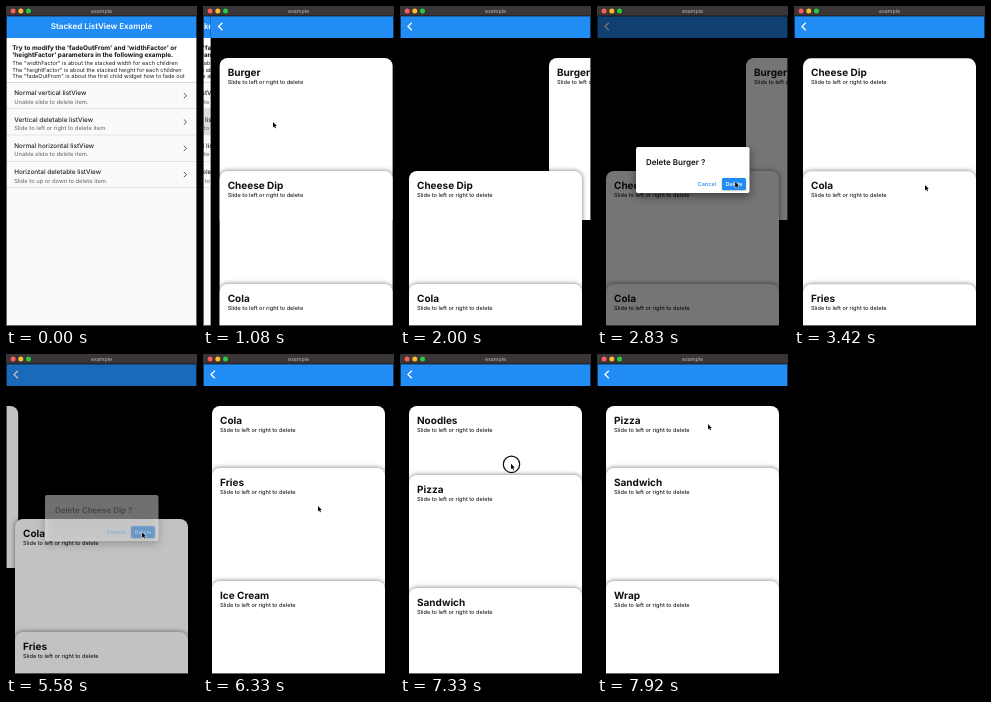
Recreate the animation shown at these times as an HTML page with a canvas. Size 191 by 320 pixels, loop 8000 ms.

```html
<!DOCTYPE html>
<html lang="en">
<head>
<meta charset="utf-8">
<title>Stacked ListView Example</title>
<style>
  html, body { margin: 0; width: 100%; height: 100%; overflow: hidden; background: #000; }
  canvas { display: block; width: 191px; height: 320px; }
</style>
</head>
<body>
<canvas></canvas>
<script>
const W = 191, H = 320, LOOP = 8000;
const BLUE = '#218cf3';
const LIST_TOP = 52, STEP = 113, CARD_W = 173, CARD_H = 162;
const MEALS = ['Burger', 'Cheese Dip', 'Cola', 'Fries', 'Ice Cream', 'Noodles', 'Pizza', 'Sandwich', 'Wrap'];
const ROWS = [
  ['Normal vertical listView', 'Unable slide to delete item.'],
  ['Vertical deletable listView', 'Slide to left or right to delete item.'],
  ['Normal horizontal listView', 'Unable slide to delete item.'],
  ['Horizontal deletable listView', 'Slide to up or down to delete item.'],
];

// The story: open a page, swipe away two cards, then scroll three times.
const TAP = 720, SWIPE_TIME = 540, FADE = 150;
const DELETIONS = [
  { grab: 1450, asked: 2230, confirmed: 2950, dx: 140 },
  { grab: 3990, asked: 4520, confirmed: 5450, dx: -125 },
];
const SCROLLS = [
  { start: 6020, time: 300, distance: 51 },
  { start: 6500, time: 660, distance: 327 },
  { start: 7250, time: 670, distance: 125 },
];
const BUTTON = { x: 137, y: 177 };
const MOVES = [
  { start: 80, time: 620, x: 70, y: 116 },
  { start: DELETIONS[0].grab, time: SWIPE_TIME, x: 210, y: 110 },
  { start: 2230, time: 650, ...BUTTON },
  { start: 3080, time: 340, x: 131, y: 179 },
  { start: 3420, time: 500, x: 151, y: 108 },
  { start: DELETIONS[1].grab, time: SWIPE_TIME, x: 26, y: 102 },
  { start: 4750, time: 600, ...BUTTON },
  { start: 5520, time: 460, x: 117, y: 203 },
  { start: SCROLLS[0].start, time: 300, x: 115, y: 152 },
  { start: SCROLLS[1].start, time: 500, x: 111, y: 113 },
  { start: SCROLLS[2].start, time: 480, x: 111, y: 70 },
];
const PRESSES = [
  { start: TAP, time: 140 },
  ...DELETIONS.flatMap(d => [{ start: d.grab, time: SWIPE_TIME - 80 }, { start: d.confirmed - 50, time: 100 }]),
  ...SCROLLS.map(s => ({ start: s.start, time: 200 })),
];

const canvas = document.querySelector('canvas');
const ctx = canvas.getContext('2d');
const scale = window.devicePixelRatio || 1;
canvas.width = W * scale;
canvas.height = H * scale;
ctx.textRendering = 'geometricPrecision';

// Eased progress from 0 to 1 over a span of time.
function phase(t, start, time) {
  const u = Math.min(1, Math.max(0, (t - start) / time));
  return u * u * (3 - 2 * u);
}

function total(items, value) {
  return items.reduce((sum, item) => sum + value(item), 0);
}

const scrollAt = t => total(SCROLLS, s => s.distance * phase(t, s.start, s.time));
const collapseAt = (d, t) => phase(t, d.confirmed + 200, 280);
const swipeAt = (d, t) =>
  d.dx * phase(t, d.grab, SWIPE_TIME) + Math.sign(d.dx) * 80 * phase(t, d.confirmed + 50, FADE);
const dialogAt = (d, t) => phase(t, d.asked, FADE) - phase(t, d.confirmed + 50, FADE);

function cursorAt(t) {
  return MOVES.reduce((from, move) => {
    const p = phase(t, move.start, move.time);
    return { x: from.x + (move.x - from.x) * p, y: from.y + (move.y - from.y) * p };
  }, { x: 198, y: 148 });
}

function text(str, x, y, size, color, weight = 400, align = 'left') {
  ctx.font = `${weight} ${size}px Inter, sans-serif`;
  ctx.textAlign = align;
  ctx.fillStyle = color;
  ctx.fillText(str, x, y);
}

function rect(x, y, w, h, color, radius = 0) {
  ctx.fillStyle = color;
  ctx.beginPath();
  ctx.roundRect(x, y, w, h, radius);
  ctx.fill();
}

function chevron(x, y, dx, dy, color, width) {
  ctx.beginPath();
  ctx.moveTo(x - dx, y - dy);
  ctx.lineTo(x, y);
  ctx.lineTo(x - dx, y + dy);
  ctx.strokeStyle = color;
  ctx.lineWidth = width;
  ctx.stroke();
}

function shadow(color, blur, offset = 0) {
  ctx.shadowColor = color;
  ctx.shadowBlur = blur * scale;
  ctx.shadowOffsetY = offset * scale;
}

function noShadow() {
  ctx.shadowColor = 'transparent';
}

function drawHome(t) {
  rect(0, 10, W, H, '#fafafa');
  rect(0, 10, W, 22, BLUE);
  text('Stacked ListView Example', W / 2, 23, 8, '#fff', 600, 'center');
  rect(0, 32, W, 44, '#fff');
  text("Try to modify the 'fadeOutFrom' and 'widthFactor' or", 6.2, 43.5, 6.4, '#111', 700);
  text("'heightFactor' parameters in the following example.", 6.2, 51.2, 6.4, '#111', 700);
  ['"widthFactor" is about the stacked width for each children',
    '"heightFactor" is about the stacked height for each children',
    '"fadeOutFrom" is about the first child widget how to fade out',
  ].forEach((line, i) => text('The ' + line, 6.2, 59 + i * 6.7, 5.6, '#222'));
  rect(0, 76, W, 0.6, '#bbb');
  ROWS.forEach(([title, note], i) => {
    const y = 76.5 + i * 26.3;
    if (i === 1 && t > TAP) rect(0, y, W, 26, '#ddd');
    text(title, 8.2, y + 12.8, 6.4, '#222', 500);
    text(note, 8.2, y + 21.3, 5.75, '#777', 500);
    chevron(180.5, y + 13.2, 2.7, 2.6, '#555', 1);
    rect(0, y + 26, W, 0.5, '#ccc');
  });
}

function drawCard(name, x, y, alpha) {
  ctx.save();
  ctx.globalAlpha *= alpha;
  shadow('rgba(0,0,0,.55)', 5);
  rect(x, y, CARD_W, CARD_H, '#fff', [8, 8, 0, 0]);
  noShadow();
  text(name, x + 8, y + 18, 10, '#111', 700);
  text('Slide to left or right to delete', x + 8, y + 25.6, 5.6, '#222', 500);
  ctx.restore();
}

function drawList(t) {
  rect(0, 10, W, H, '#000');
  const scroll = scrollAt(t);
  MEALS.forEach((name, i) => {
    const removed = total(DELETIONS.slice(0, i), d => collapseAt(d, t));
    const y = LIST_TOP + STEP * (i - removed) - scroll;
    const passed = (LIST_TOP - y) / STEP;
    const dx = DELETIONS[i] ? swipeAt(DELETIONS[i], t) : 0;
    if (passed >= 1 || y > H + 5 || Math.abs(dx) >= W) return;
    // The top card stays pinned, then fades as the next one covers it.
    drawCard(name, 9 + dx, Math.max(LIST_TOP, y), Math.min(1, (1 - passed) / 0.3));
  });
  rect(0, 10, W, 22, BLUE);
  chevron(8, 20.5, -3.8, 3.7, '#fff', 1.3);
}

function drawDialog(name, alpha) {
  ctx.save();
  ctx.globalAlpha = alpha;
  rect(0, 10, W, H, 'rgba(0,0,0,.54)');
  shadow('rgba(0,0,0,.5)', 8, 3);
  rect(39, 141, 113.5, 46, '#fff', 2);
  noShadow();
  text(`Delete ${name} ?`, 49, 158.7, 8, '#111', 600);
  text('Cancel', 110, 180.2, 5.6, BLUE, 500, 'center');
  shadow('rgba(0,0,0,.4)', 1.5, 0.6);
  rect(125, 172, 24, 12, BLUE, 1.6);
  noShadow();
  text('Delete', 137, 180.2, 5.6, '#fff', 500, 'center');
  ctx.restore();
}

function drawWindow() {
  rect(0, 0, W, 10, '#3a3537');
  ['#fc5b57', '#fdbc2e', '#28c840'].forEach((color, i) => rect(4.6 + i * 7.7, 2.6, 5, 5, color, 2.5));
  text('example', W / 2, 7, 5.3, '#bdb9ba', 400, 'center');
  ctx.strokeStyle = 'rgba(0,0,0,.6)';
  ctx.lineWidth = 1;
  ctx.strokeRect(0.5, 10, W - 1, H - 10.5);
}

function drawCursor(t) {
  const { x, y } = cursorAt(t);
  if (PRESSES.some(p => t >= p.start && t < p.start + p.time)) {
    ctx.beginPath();
    ctx.arc(x + 0.5, y + 0.6, 8.2, 0, Math.PI * 2);
    ctx.strokeStyle = '#111';
    ctx.lineWidth = 1.2;
    ctx.stroke();
  }
  ctx.save();
  ctx.translate(x, y);
  ctx.beginPath();
  [[0, 0], [0, 5.4], [1.2, 4.3], [2.1, 6.3], [3, 5.9], [2.2, 4], [3.8, 3.9]].forEach(p => ctx.lineTo(...p));
  ctx.closePath();
  ctx.strokeStyle = '#fff';
  ctx.lineWidth = 0.9;
  ctx.stroke();
  ctx.fillStyle = '#000';
  ctx.fill();
  ctx.restore();
}

function draw(t) {
  ctx.setTransform(scale, 0, 0, scale, 0, 0);
  const page = 1 - (1 - phase(t, TAP + 140, 310)) ** 2;
  if (page < 1) {
    ctx.save();
    ctx.translate(-page * W / 3, 0);
    drawHome(t);
    ctx.restore();
  }
  if (page > 0) {
    ctx.save();
    ctx.translate((1 - page) * W, 0);
    drawList(t);
    ctx.restore();
  }
  DELETIONS.forEach((d, i) => {
    const alpha = dialogAt(d, t);
    if (alpha > 0) drawDialog(MEALS[i], alpha);
  });
  drawWindow();
  drawCursor(t);
}

const start = performance.now();
function tick() {
  draw((performance.now() - start) % LOOP);
  requestAnimationFrame(tick);
}
tick();
</script>
</body>
</html>
```
